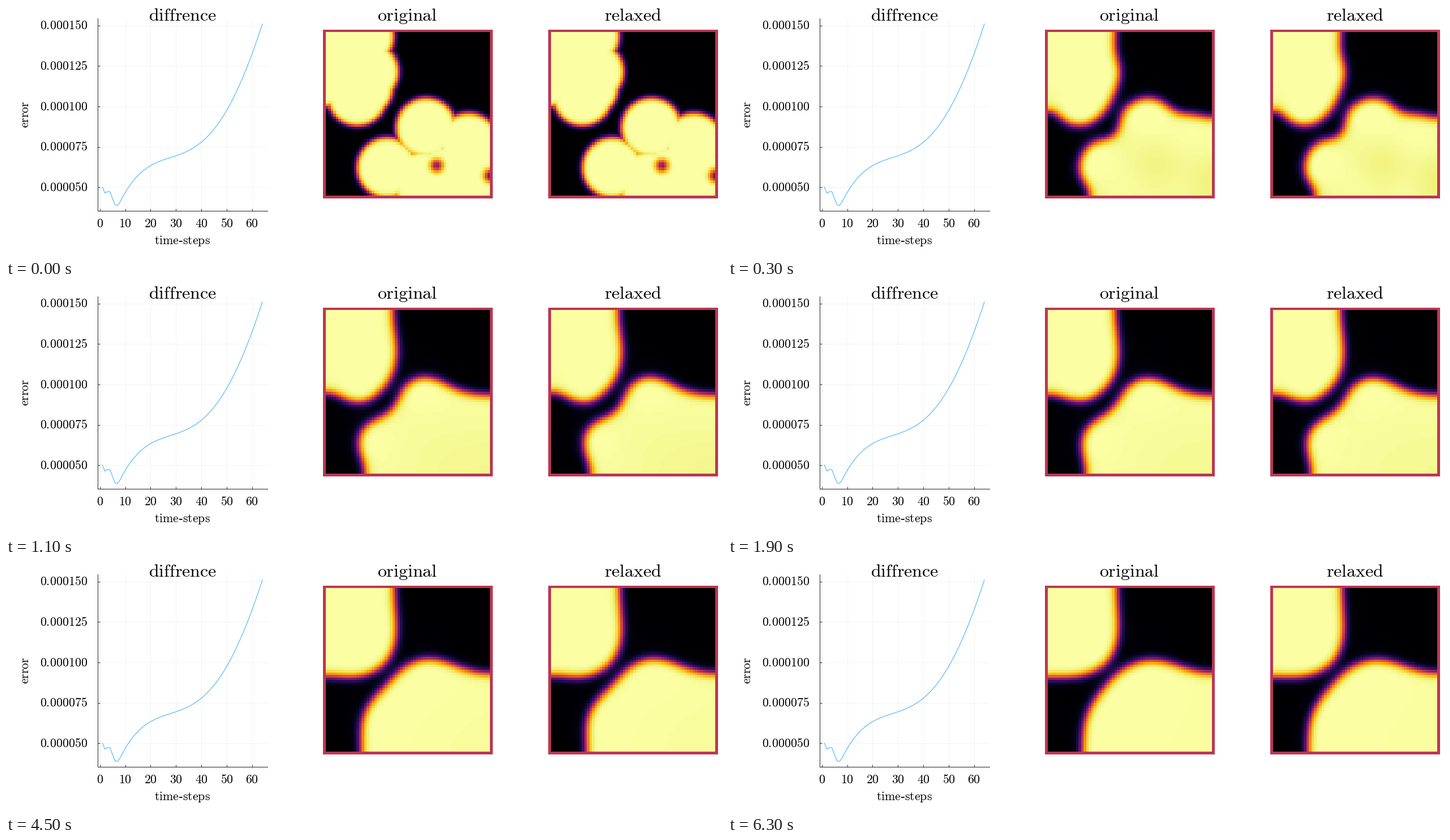
A matplotlib script that plays this animation: 1265 px wide and 443 px high, repeating every 6400 ms.

```python
import numpy as np
import matplotlib.pyplot as plt
from matplotlib.animation import FuncAnimation
from matplotlib.transforms import IdentityTransform

plt.rcParams["font.family"] = "Liberation Serif"
plt.rcParams["mathtext.fontset"] = "cm"

W, H, DPI = 1265, 443, 100
PT = 72 / DPI
STEPS = 64
N = 64
LEFT, TOP, SIDE = 559.9, 42, 299.5
PANEL_GAP = 397.9

# Cahn-Hilliard model in cell units.
EPS2 = (8 / 3) ** 2
STABILISER = 8
SUBSTEPS = 60
RADIUS = 11.9
START_WIDTH = 1.15
DISCS = [(14.9, 1.8), (16.7, 15.6), (14.5, 21.6), (12.3, 24.9), (-0.5, 17.4),
         (4.6, 5.1), (39.1, 37.5), (23.9, 53), (55.6, 43.4), (37.6, 57.9),
         (46.4, 55.7), (57.4, 55.7)]
HOLES = [(43.2, 52.2, 1.3), (64.1, 56.1, 1.5)]


def start_field():
    """Overlapping discs of one radius with two small holes."""
    x, y = np.meshgrid(np.arange(N) + 0.5, np.arange(N) + 0.5)
    depth = np.max([RADIUS - np.hypot(x - cx, y - cy) for cx, cy in DISCS], axis=0)
    c = np.tanh(depth / START_WIDTH)
    for cx, cy, drop in HOLES:
        c -= drop * np.exp(-((x - cx)**2 + (y - cy)**2) / 4.8)
    return c


def simulate(step_time):
    """Phase separation with no-flux walls, one field per time step."""
    k = np.arange(N)
    dct = np.sqrt(2 / N) * np.cos(np.pi * np.outer(k, k + 0.5) / N)
    dct[0] /= np.sqrt(2)
    eig = 2 * np.cos(np.pi * k / N) - 2
    lap = eig[:, None] + eig[None, :]
    dt = step_time / SUBSTEPS
    implicit = 1 - dt * STABILISER * lap + dt * EPS2 * lap**2

    c = start_field()
    fields = [c]
    for _ in range(STEPS - 1):
        for _ in range(SUBSTEPS):
            force = 4 * (c**3 - c) - STABILISER * c
            modes = dct @ c @ dct.T + dt * lap * (dct @ force @ dct.T)
            c = dct.T @ (modes / implicit) @ dct
        fields.append(c)
    return [np.pad(np.clip(f, -1, 1), 1) for f in fields]


def pixel_axes(x, y, w, h):
    return fig.add_axes([x / W, 1 - (y + h) / H, w / W, h / H])


def label(x, y, text, size, ha="center", rotation=0):
    fig.text(x, H - y, text, fontsize=size * PT, ha=ha, va="baseline",
             rotation=rotation, rotation_mode="anchor",
             transform=IdentityTransform())


def roman(text):
    return r"$\mathrm{%s}$" % text


def error_curve(steps):
    """A short jagged start, then a smooth rise through a few knots."""
    start = [50.2, 46.4, 47.3, 47.3, 43.1, 39.1, 38.8]
    knots = [8, 12, 20, 30, 40, 50, 64]
    values = [41, 51.6, 63.4, 69.5, 77.9, 97.7, 151]
    rise = np.polynomial.Polynomial.fit(knots, values, 6)
    return np.r_[start, rise(steps[len(start):])]


def draw_error_plot():
    ax = pixel_axes(161.7, 21.9, 299.8, 341.2)
    ax.set(xlim=(-0.89, 65.89), ylim=(35.4, 154.4),
           xticks=range(0, 61, 10), yticks=range(50, 151, 25))
    ax.tick_params(direction="in", length=3, width=PT * 0.8,
                   labelbottom=False, labelleft=False)
    ax.grid(color="#f3f3f3", lw=PT)
    ax.set_axisbelow(True)
    ax.spines[["top", "right"]].set_visible(False)
    ax.spines[["left", "bottom"]].set_linewidth(PT)
    ax.spines[["left", "bottom"]].set_color("#222222")

    steps = np.arange(1, STEPS + 1)
    ax.plot(steps, error_curve(steps), color="#009afa", lw=0.8 * PT)

    for v in range(0, 61, 10):
        label(165.7 + 4.489 * v, 392, roman(v), 22)
    for v in range(50, 151, 25):
        label(144, 328 - 2.868 * (v - 50), roman(f"{v / 1e6:.6f}"), 22, ha="right")
    label(312, 422.5, r"$\mathrm{time}$-$\mathrm{steps}$", 22)
    label(39.5, 192.5, roman("error"), 22, rotation=90)


def add_heatmap(x):
    ax = pixel_axes(x, TOP, SIDE, SIDE)
    ax.axis("off")
    return ax.imshow(np.zeros((N + 2, N + 2)), cmap="inferno", vmin=-1, vmax=1,
                     interpolation="nearest", aspect="auto")


fig = plt.figure(figsize=(W / DPI, H / DPI), dpi=DPI, facecolor="white")
draw_error_plot()
for i, title in enumerate(("diffrence", "original", "relaxed")):
    label(311.7 + PANEL_GAP * i, 26.5, roman(title), 32)
images = [add_heatmap(LEFT + PANEL_GAP * i) for i in range(2)]
runs = [simulate(step_time) for step_time in (1.2, 1.1)]


def update(step):
    for image, fields in zip(images, runs):
        image.set_data(fields[step])
    return images


anim = FuncAnimation(fig, update, frames=STEPS, interval=100, repeat=True,
                     repeat_delay=0, blit=False)
plt.show()
```
